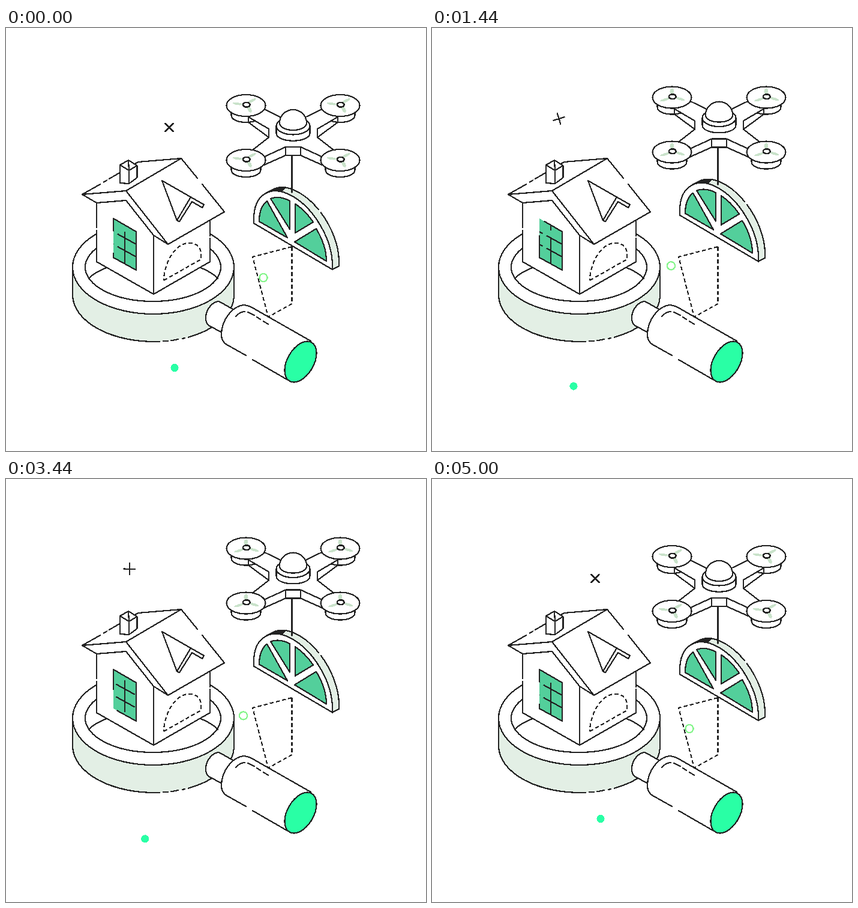
Recreate the animation shown at these times as an HTML page. Size 700 by 704 pixels, loop 5040 ms.

```html
<!DOCTYPE html>
<html lang="en">
<head>
<meta charset="utf-8">
<title>House, magnifier and drone</title>
<style>
  html, body { margin: 0; width: 100%; height: 100%; overflow: hidden; background: #fff; }
  svg { display: block; width: 100vw; height: 100vh; shape-rendering: crispEdges; }
  .ink { fill: none; stroke: #222; stroke-width: 2.2; stroke-linejoin: round; stroke-linecap: round; }
  .paper { fill: #fff; }
  .mint { fill: #e3efe5; }
  .pane { fill: #53cf9b; }
  .dash { stroke-dasharray: 6.5 4; stroke-linecap: butt; }
  .bare { stroke: none; }
  .trim { stroke-dasharray: 83 17; stroke-linecap: butt; }
</style>
</head>
<body>
<svg viewBox="0 0 700 704">
  <g class="ink">
    <!-- lens ring -->
    <path class="mint bare" d="M111 398V444A134.5 78 0 0 0 380 444V398Z"/>
    <path d="M111 398V444A134.5 78 0 0 0 256 521.6M262 521.3L270 520.6M275 520.2Q281 519.5 287 518M294 517L298 516M304 514.6A134.5 78 0 0 0 380 444V398"/>
    <ellipse class="paper" cx="245.5" cy="398" rx="134.5" ry="78"/>
    <ellipse cx="245" cy="398" rx="113" ry="57"/>
    <path d="M138 417Q148 406 170 398M353 417Q343 406 322 398"/>

    <!-- house walls -->
    <path class="paper bare" d="M151 291L200 287L246 345L340 300V389L246 443L151 389Z"/>
    <path d="M151 291V332M151 337V389L246 443L340 389V350M340 346V320M246 345V443"/>
    <path class="dash" d="M263 420L325 385V374C324 362 314 357 302 358C280 361 263 394 263 420"/>

    <!-- window -->
    <path class="pane bare" d="M179 317L217 339V403L179 382Z"/>
    <path id="frame" class="trim" pathLength="100" d="M179 317L217 339V403L179 382Z"/>
    <g id="bars">
      <path class="trim" pathLength="100" d="M198 328V392"/>
      <path class="trim" pathLength="100" d="M179 339L217 360"/>
      <path class="trim" pathLength="100" d="M179 360L217 381"/>
    </g>

    <!-- roof -->
    <path class="paper bare" d="M127 277L220 223L292 217L364 306L270 360L246 345L200 287L151 291Z"/>
    <path d="M157 260L127 277L151 291L200 287L246 345L270 360L364 306L327 260M319 250L292 217L220 223L172 251M168 253.500L163 256.500M127 277L200 271L292 217M200 271L270 360"/>
    <path class="paper" d="M190 228L204 220L218.500 229V249L205 259L190 258Z"/>
    <path d="M190 228L205 237L218.500 229M205 259V237L204 220"/>
    <path d="M260 254L330 294L327 299L310 289L289 322L285 320.500ZM285 320L307 283"/>

    <!-- handle -->
    <path class="dash" d="M476.500 364L411 381L437 481L476.500 459Z"/>
    <path class="paper" d="M378 468L357 456C347 452 332 468 333 484Q333 491 338 495L360 507"/>
    <path class="paper bare" d="M359 510C359 488 376 462 398 461L408 464L512 523L470 587L368 527Q359 522 359 510Z"/>
    <path d="M400 545L368 527Q359 522 359 510C359 488 376 462 398 461L408 464L508 521M411 552L470 586"/>
    <path d="M383 480Q390 472 398 472M403 473L414 478M418 481L424 485M429 488L437 493"/>
    <ellipse cx="491" cy="555.500" rx="37" ry="22" transform="rotate(-60 491 555.500)" fill="#29ffa5"/>

    <!-- drone with its load -->
    <g id="drone">
      <path class="mint" pathLength="100" stroke-dasharray="42.500 2.500 100" d="M544 402L555 396V389C555 347 525.700 295.800 489.500 274.500S424 270 424 312"/>
      <path fill="#222" d="M433 275L444 269Q455 264 466 265.500L458 273Q447 270 433 275Z"/>
      <path class="paper" d="M413 325V318C413 276 442.300 259.200 478.500 280.500S544 353 544 395V402Z"/>
      <g class="pane">
        <path d="M422 322Q422 298 435 288L469 349Z"/>
        <path d="M441 284Q455 278.500 473 287.500V335Z"/>
        <path d="M482 292.500Q499 304 512 323L482 341Z"/>
        <path d="M517 334Q534 362 534 388L481 356Z"/>
      </g>
      <path d="M476.500 212V274"/>
      <g id="cups"></g>
      <path class="paper bare" d="M404 149L438 168V182L411 203L431 227L466 212H491L526 227L546 203L519 182V168L553 149L525 136L501 147H456L432 136Z"/>
      <path d="M432 136L457 148M525 136L500 148M404 148L438 168V182L404 157ZM553 148L519 168V182L553 157ZM438 182L411 203M519 182L546 203M466 198H491V212H466ZM466 198L431 214M466 212L430 228M491 198L526 214M491 212L527 228"/>
      <path class="paper" d="M450.500 163V175C450.500 192 506.500 192 506.500 175V163Z"/>
      <ellipse class="paper" cx="478.500" cy="163" rx="28" ry="14.500"/>
      <path class="paper" d="M456 158A22.500 22 0 0 1 501 158C501 174 456 174 456 158Z"/>
      <g id="discs"></g>
    </g>
  </g>

  <!-- drifting marks -->
  <path id="cross" class="ink" d="M-9.500 0H9.500M0 -9.500V9.500"/>
  <circle id="dot" r="6.600" fill="#29ffa5"/>
  <circle id="ring" r="6.600" fill="none" stroke="#86f58c" stroke-width="2.300"/>
</svg>
<script>
  const $ = id => document.getElementById(id);
  const rotors = [[400, 129], [557, 129], [400, 220], [557, 220]];
  const blade = angle =>
    `<path transform="rotate(${angle})" d="M4 0C10 -6 20 -5 24 0C20 4 10 3 4 0Z"/>`;

  $('cups').innerHTML = rotors.map(([x, y]) =>
    `<path class="paper" transform="translate(${x} ${y})" d="M-24.500 10v6c0 16 49 16 49 0v-6"/>`).join('');
  $('discs').innerHTML = rotors.map(([x, y]) => `<g transform="translate(${x} ${y})">
    <ellipse class="paper" rx="32.500" ry="18"/>
    <g transform="translate(.8 -1.300) scale(1 .6)"><g class="spin bare" fill="#c9e2ca">${[0, 120, 240].map(blade).join('')}</g></g>
    <ellipse class="paper" cx=".8" cy="-1.300" rx="5.800" ry="3.900" style="stroke-width:2.600"/></g>`).join('');

  const spinners = document.querySelectorAll('.spin');
  const bars = document.querySelectorAll('#bars path');
  const setTransform = (el, value) => el.setAttribute('transform', value);

  // Smooth rise and fall, 0 to 1 to 0, once per period.
  const sway = (t, period) => {
    const u = 1 - Math.abs(1 - 2 * (t % period) / period);
    return u * u * (3 - 2 * u);
  };
  // Centres the gap of a trimmed outline at a percentage of its length.
  const placeGap = (el, centre) => el.setAttribute('stroke-dashoffset', -(centre + 8.5));

  function draw(now) {
    const t = Math.floor(now % 5040 / 40) * 40;
    const drift = sway(t, 4980);
    const turn = 300 * t / 5000;

    setTransform($('drone'), `translate(0 ${-14 * sway(t, 1000)})`);
    spinners.forEach(el => setTransform(el, `rotate(${72 + 0.72 * t})`));
    placeGap($('frame'), 82 - turn);
    bars.forEach(el => placeGap(el, 9 - turn));

    setTransform($('cross'), `translate(${272 - 98 * drift} ${165.5 - 23.5 * drift}) rotate(${45 + 0.144 * t})`);
    setTransform($('dot'), `translate(${281 - 73 * drift} ${565.5 + 49.5 * drift})`);
    setTransform($('ring'), `translate(${429 - 49.5 * drift} ${415.5 - 32 * drift})`);
    requestAnimationFrame(draw);
  }
  requestAnimationFrame(draw);
</script>
</body>
</html>
```
